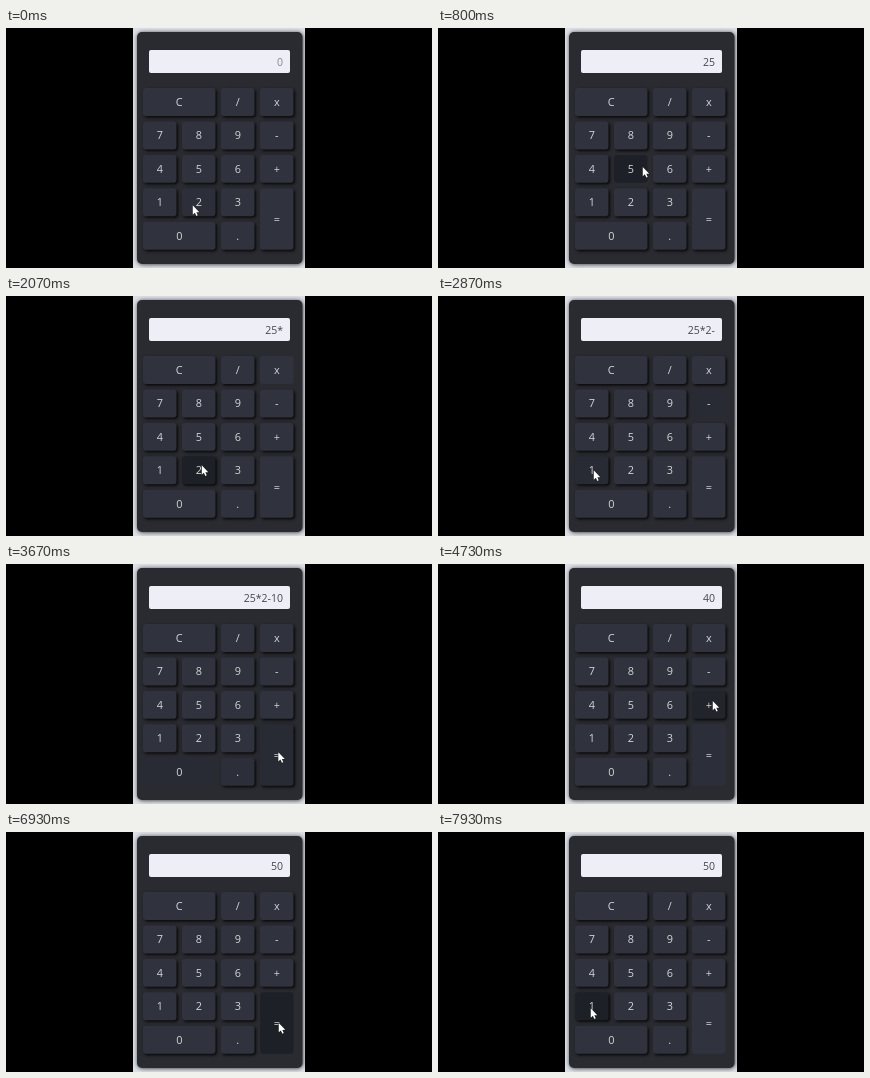
These frames come from a looping animation (426x240 px, 8 s). An HTML page with a canvas:

```html
<!DOCTYPE html>
<html lang="en">
<head>
<meta charset="utf-8">
<title>Calculator</title>
<style>
  html, body { margin: 0; width: 100%; height: 100%; overflow: hidden; background: #000; }
  canvas { display: block; width: 100vw; height: 100vh; }
</style>
</head>
<body>
<canvas id="stage"></canvas>
<script>
const W = 426, H = 240, LOOP = 8000, STEP = 1000 / 15;
const canvas = document.getElementById('stage');
const ctx = canvas.getContext('2d');
const ratio = window.devicePixelRatio || 1;
canvas.width = W * ratio;
canvas.height = H * ratio;

const FAMILY = '"Open Sans", "Noto Sans", sans-serif';
const ARROW = new Path2D('M0 0v9.3l2.1-1.9 1.5 3.2 1.4-.6-1.4-3.1 2.9-.1z');
const FADE_FRAMES = 5;

// A repeated label spans several cells.
const GRID = ['CC/x', '789-', '456+', '123=', '00.='];
const CELL_W = 39, CELL_H = 33.45, GAP = 5.5;

const buttons = {};
GRID.forEach((line, row) => [...line].forEach((label, col) => {
  const b = buttons[label] ??= { label, x: 137 + col * CELL_W, y: 60 + row * CELL_H };
  b.w = 137 + (col + 1) * CELL_W - GAP - b.x;
  b.h = 60 + (row + 1) * CELL_H - GAP - b.y;
}));

// Each press: key, time, pointer offset from the key's centre
const presses = [
  ['2', 200, -6, 3], ['5', 700, 12, -2], ['x', 1400], ['2', 2130, 3, -5],
  ['-', 2600], ['1', 2930], ['0', 3200, 14, 0], ['=', 4000, 2, -3],
  ['+', 5200, 4, -4], ['1', 5450], ['0', 6100, 14, 2], ['=', 6670], ['1', 8130, -1, 2]
].map(([key, time, dx = 2, dy = 0]) => {
  const b = buttons[key];
  return { key, time, x: b.x + b.w / 2 + dx, y: b.y + b.h / 2 + dy };
});

const clamp = p => Math.min(1, Math.max(0, p));
const ease = p => p * p * (3 - 2 * p);
const mix = (a, b, p) => a + (b - a) * p;

// The pointer rests after a press, travels, then settles before the next one.
function pointerAt(t) {
  const i = Math.max(1, presses.findIndex(p => p.time > t));
  const from = presses[i - 1], to = presses[i];
  const part = (t - from.time) / (to.time - from.time);
  const p = ease(clamp((part - 0.2) / 0.4));
  return { x: mix(from.x, to.x, p), y: mix(from.y, to.y, p) };
}

function evaluate(text) {
  const product = term => term.split('*').reduce((a, n) => a * n, 1);
  return String(text.replace(/-/g, '+-').split('+').reduce((sum, term) => sum + product(term.replace('-', '-1*')), 0));
}

function type(text, key) {
  if (key === '=') return evaluate(text);
  return text + (key === 'x' ? '*' : key);
}

function isOver(b, t) {
  if (t < 0) return false;
  const { x, y } = pointerAt(t);
  return x >= b.x && x <= b.x + b.w && y >= b.y && y <= b.y + b.h;
}

// Linear hover fade: share of recent frames spent over the button
function hoverLevel(b, t) {
  let hits = 0;
  for (let k = 0; k < FADE_FRAMES; k++) hits += isOver(b, t - k * STEP);
  return hits / FADE_FRAMES;
}

function box(x, y, w, h, r, fill, shadow) {
  ctx.save();
  if (shadow) {
    ctx.shadowColor = shadow.color;
    ctx.shadowBlur = shadow.blur * ratio;
    ctx.shadowOffsetX = ctx.shadowOffsetY = shadow.offset * ratio;
  }
  ctx.fillStyle = fill;
  ctx.beginPath();
  ctx.roundRect(x, y, w, h, r);
  ctx.fill();
  ctx.restore();
}

function write(text, x, y, size, color, align) {
  ctx.font = `${size}px ${FAMILY}`;
  ctx.textAlign = align;
  ctx.fillStyle = color;
  ctx.fillText(text, x, y);
}

function drawButton(b, t, focused) {
  const p = hoverLevel(b, t);
  const fill = `rgb(${mix(48, 29, p)}, ${mix(51, 32, p)}, ${mix(61, 39, p)})`;
  const shadow = focused ? null : { color: 'rgba(0,0,0,.85)', blur: 3, offset: 1.5 };
  box(b.x, b.y, b.w, b.h, 3, fill, shadow);
  write(b.label, b.x + b.w / 2, b.y + b.h / 2 + 4, 10.9, '#d6d6d9', 'center');
}

function drawPointer({ x, y }) {
  ctx.save();
  ctx.translate(x, y);
  ctx.lineWidth = 0.8;
  ctx.strokeStyle = '#15171c';
  ctx.stroke(ARROW);
  ctx.fillStyle = '#fff';
  ctx.fill(ARROW);
  ctx.restore();
}

function draw(t) {
  const done = presses.filter(p => p.time <= t);
  const focus = done.at(-1)?.key;
  const text = done.reduce((value, p) => type(value, p.key), '');

  ctx.setTransform(ratio, 0, 0, ratio, 0, 0);
  ctx.fillStyle = '#000';
  ctx.fillRect(0, 0, W, H);

  ctx.save();
  ctx.beginPath();
  ctx.rect(127, 0, 172, H);
  ctx.clip();
  ctx.fillStyle = '#dcdfe5';
  ctx.fillRect(127, 0, 172, H);
  box(131, 4, 165.5, 232, 5, '#2a2b31', { color: 'rgba(0,0,0,.75)', blur: 4, offset: 0.5 });
  box(143, 22, 141, 23, 2, '#eeeef6');
  write(text || '0', 277, 38, 10.5, text ? '#46474c' : '#85868c', 'right');
  for (const b of Object.values(buttons)) drawButton(b, t, b.label === focus);
  drawPointer(pointerAt(t));
  ctx.restore();
}

const start = performance.now();
function tick() {
  const t = (performance.now() - start) % LOOP;
  draw(Math.floor((t + 4) / STEP) * STEP % LOOP);
  requestAnimationFrame(tick);
}
tick();
</script>
</body>
</html>
```
